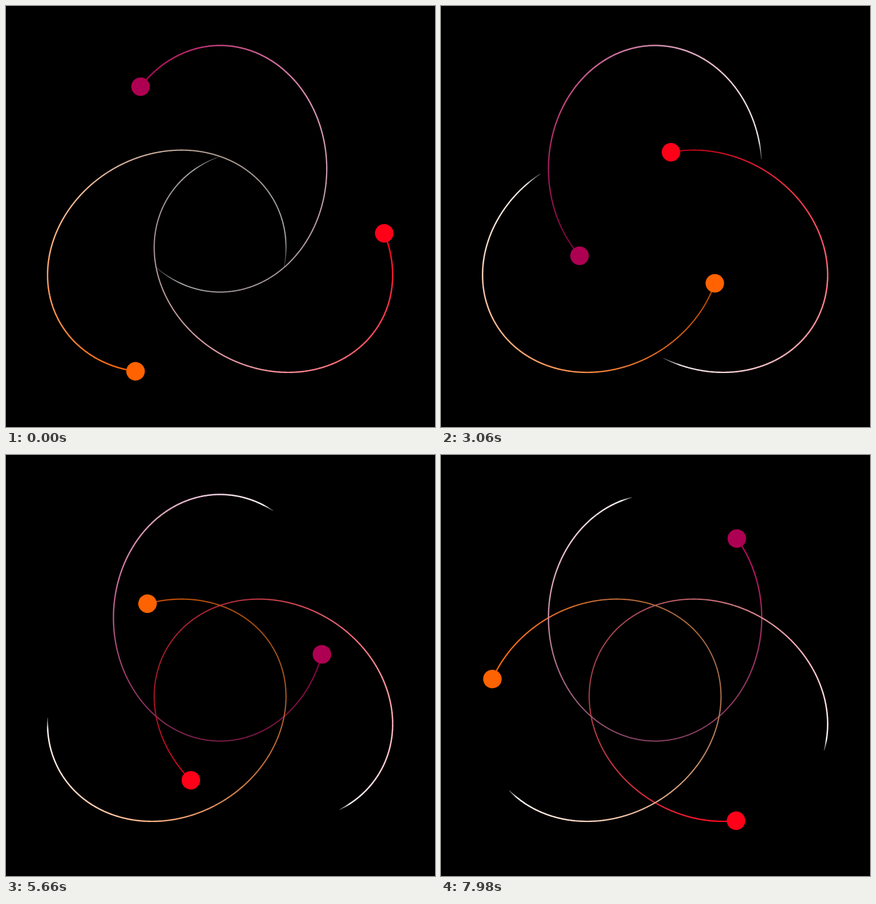
Recreate the animation shown at these times as an HTML page with a canvas. Size 756 px wide and 741 px high, loop 8000 ms.

```html
<!DOCTYPE html>
<html lang="en">
<head>
<meta charset="utf-8">
<title>Three orbits</title>
<style>
  html, body { margin: 0; width: 100%; height: 100%; overflow: hidden; background: #000; }
  canvas { display: block; }
</style>
</head>
<body>
<canvas id="stage" width="756" height="741"></canvas>
<script>
const ctx = document.getElementById('stage').getContext('2d');
const TAU = 2 * Math.PI;
const LOOP = 8000, STEP = 20;
const FOCUS = { x: 377.3, y: 395 };
const MAJOR = 217, ECC = 0.5;
const MINOR = MAJOR * Math.sqrt(1 - ECC * ECC);
const TRAIL = 4.7, TAPER = 0.15, SEGMENTS = 360;
const DISC = 16.3;
const bodies = [
  { color: [174, 0, 82], turn: 0 },
  { color: [255, 0, 24], turn: TAU / 3 },
  { color: [255, 98, 0], turn: 2 * TAU / 3 }
];

// Anomalies are measured from the far end of the orbit.
const meanOf = ecc => ecc + ECC * Math.sin(ecc);

function eccentricOf(mean) {
  let e = mean;
  for (let i = 0; i < 10; i++) e -= (meanOf(e) - mean) / (1 + ECC * Math.cos(e));
  return e;
}

function meanAt(ms) {
  return ms < 1020
    ? 1.215 + 0.531 * ms / 1020
    : 1.747 + (ms - 1020) * TAU / 13333;
}

function pointAt(ecc) {
  return [-MINOR * Math.sin(ecc), -MAJOR * (ECC + Math.cos(ecc))];
}

function drawTrail(color, head, mean) {
  const tail = eccentricOf(mean - TRAIL);
  const step = (head - tail) / SEGMENTS;
  ctx.globalCompositeOperation = 'lighten';
  for (let i = 0; i < SEGMENTS; i++) {
    const ecc = tail + i * step;
    const age = Math.min(1, (mean - meanOf(ecc + step / 2)) / TRAIL);
    const taper = Math.min(1, (1 - age) * TRAIL / TAPER);
    const far = (1 + Math.cos(ecc)) / 2;
    const light = (0.66 + 0.34 * Math.min(1, far * 1.3)) * (0.35 + 0.65 * taper);
    const rgb = color.map(c => Math.round((c + (255 - c) * age) * light));
    ctx.strokeStyle = `rgb(${rgb})`;
    ctx.lineWidth = (2 + 0.5 * far) * (0.4 + 0.6 * taper);
    ctx.beginPath();
    ctx.moveTo(...pointAt(ecc));
    ctx.lineTo(...pointAt(ecc + step * 1.15));
    ctx.stroke();
  }
}

function drawDisc(color, head) {
  ctx.globalCompositeOperation = 'source-over';
  ctx.fillStyle = `rgb(${color})`;
  ctx.beginPath();
  ctx.arc(...pointAt(head), DISC, 0, TAU);
  ctx.fill();
}

function render(ms) {
  const mean = meanAt(ms);
  const head = eccentricOf(mean);
  ctx.globalCompositeOperation = 'source-over';
  ctx.fillStyle = '#000';
  ctx.fillRect(0, 0, 756, 741);
  for (const draw of [drawTrail, drawDisc]) {
    for (const { color, turn } of bodies) {
      ctx.save();
      ctx.translate(FOCUS.x, FOCUS.y);
      ctx.rotate(turn);
      draw(color, head, mean);
      ctx.restore();
    }
  }
}

const start = performance.now();
function tick() {
  const ms = (performance.now() - start) % LOOP;
  render(Math.floor(ms / STEP) * STEP);
  requestAnimationFrame(tick);
}
tick();
</script>
</body>
</html>
```
